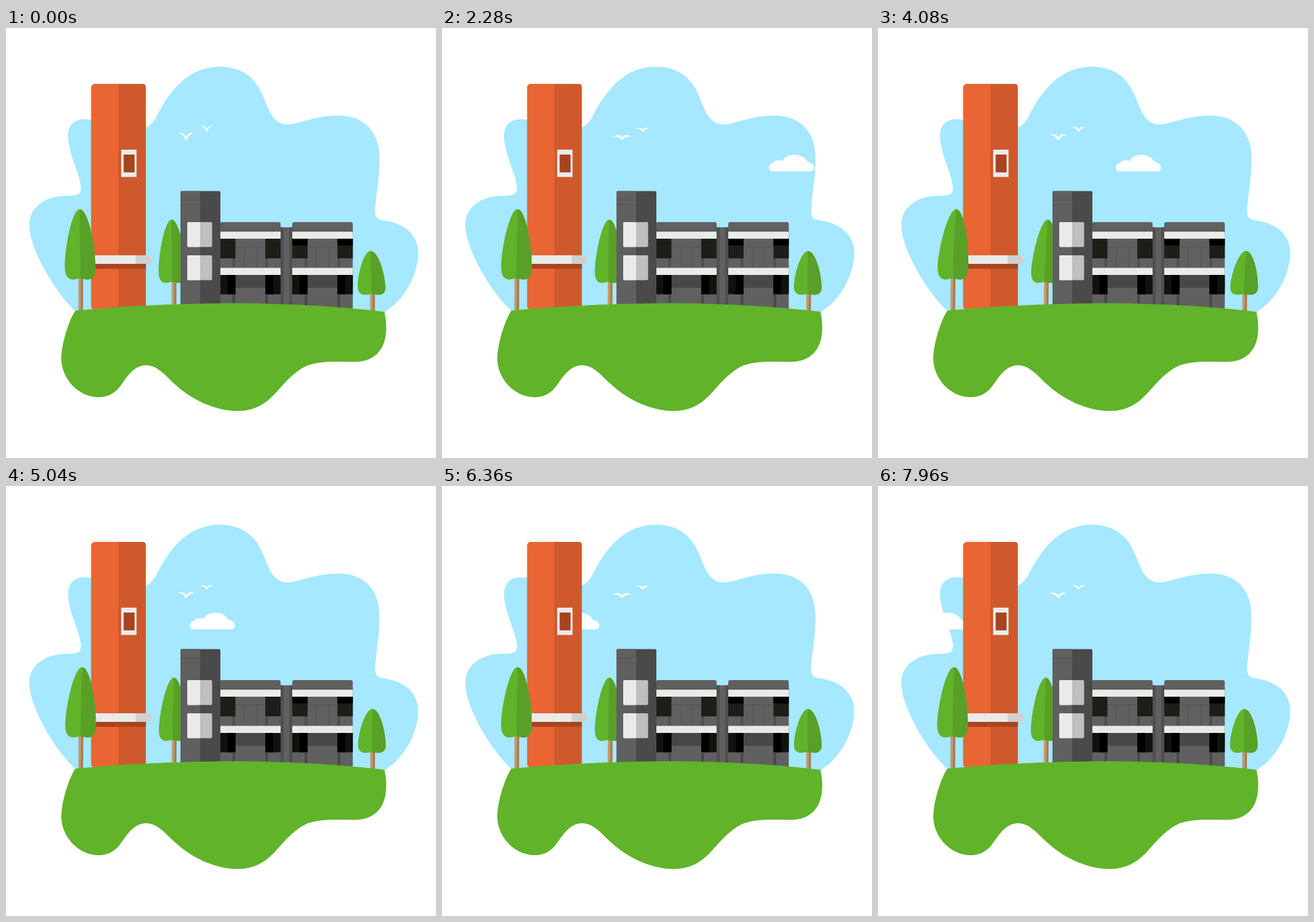
Recreate the animation shown at these times as an HTML page. Size 700 px wide and 700 px high, loop 8 s.

```html
<!DOCTYPE html>
<html lang="en">
<head>
<meta charset="utf-8">
<title>Campus</title>
<style>
html, body { margin: 0; width: 100%; height: 100%; overflow: hidden; background: #fff; }
svg { display: block; width: 100vw; height: 100vh; }
</style>
</head>
<body>
<svg viewBox="0 0 700 700">
  <path fill="#a5e8ff" d="M113 461C80 430 38 360 38 320C38 293 62 275 92 273.5C108 272.5 122 275 122 261C122 240 101 205 101 176C101 158 112 145 139 149.500L180 200L228 162C234 159 239 154 243 148C262 110 292 63 348 63C388 63 408 85 418 110C428 133 434 157 459 157C478 156 502 143 540 142.500C585 142.500 608 170 608 213C608 250 601 275 601 299C601 314 612 312 624 315C650 320 671 338 671 366C671 403 647 444 617 462Z"/>
  <path id="cloud" fill="#fff" d="M6.500 233.500C-2 233.500 -2 220.500 7 219.500C10 214.500 18 214.500 22 216.500C30 202.500 55 202.500 63.500 218C76 220 77 233.500 67 233.500Z"/>
  <g fill="#fff">
    <path class="bird"/>
    <path class="bird" transform="translate(326.800 169) scale(.78) translate(-293.300 -183)"/>
  </g>
  <g id="tower">
    <rect x="138.500" y="91" width="89" height="367.500" rx="6" fill="#e96533"/>
    <path fill="#cf592d" d="M183 91H223Q227.500 91 227.500 96V458.500H183Z"/>
    <path fill="#ebebea" d="M187.500 198h25v44.500h-25z"/>
    <path fill="#a94420" d="M191.500 206h17.800v29h-17.800zM138.500 384h89v8h-89z"/>
    <rect x="131" y="370" width="105.500" height="14" rx="1.500" fill="#e8eae8"/>
    <path fill="#d0d0d0" d="M211 370h24q1.500 0 1.500 1.500v11q0 1.500-1.500 1.500h-24z"/>
  </g>
  <g id="back"></g>
  <g id="hall"></g>
  <g id="front"></g>
  <path fill="#61b329" d="M113 460C200 452 290 448 370 448C455 448 540 453 616 462C619 475 619.500 485 618.500 497C616 525 598 544 567 543.500C530 543.500 502 541 480 555C455 572 445 590 430 603C415 617 397 623.500 377 623.500C337 623 300 603 275 580C262 569 248 549 228 549C207 549 196 570 186 583C178 594 166 601 151 601C117 601 90 570 90 538C90 515 102 476 113 460Z"/>
</svg>
<script>
const LOOP = 8000;
const $ = s => document.querySelector(s);
const make = (parent, tag, attrs) => {
  const el = document.createElementNS('http://www.w3.org/2000/svg', tag);
  for (const k in attrs) el.setAttribute(k, attrs[k]);
  return parent.appendChild(el);
};
const ease = p => p * p * (3 - 2 * p);
// 0 -> 1 -> 0 over one period
const swing = (t, period) => {
  const p = t / period % 1 * 2;
  return ease(p < 1 ? p : 2 - p);
};

// Buildings
const hall = $('#hall');
const box = (x, y, w, h, fill, rx = 0) =>
  make(hall, 'rect', { x, y, width: w, height: h, fill, rx });

box(447, 324.500, 19, 136, '#606060');
box(447, 324.500, 5, 136, '#505050');
box(461, 324.500, 5, 136, '#505050');

function wing(x, deepShade) {
  box(x, 316, 98.500, 145, '#606060', 3);
  box(x, 329.500, 98.500, 2, '#555');
  box(x + 24, 356, 49, .8, '#505050');
  for (const dx of [39, 59]) box(x + dx, 356, .8, 34, '#505050');
  box(x, 402, 98.500, 21, '#484848');
  for (const dx of [0, 73.500]) {
    box(x + dx, 343, 25, 32, '#1c1e17');
    if (deepShade) box(x + dx, 343, 25, 11, '#000');
    box(x + dx, 402, 25, 31.500, '#10120d');
    box(x + dx + (dx ? 0 : 12), 402, 13, 31.500, '#000');
  }
  for (const dx of [20, 73.500]) {
    box(x + dx, 375, 4.500, 15, '#505050');
    box(x + dx, 433.500, 4.500, 28, '#4a4a4a');
  }
  box(x, 331.500, 98.500, 11.500, '#e9ebe9');
  box(x, 390.500, 98.500, 11.500, '#e9ebe9');
}
wing(348.500, false);
wing(466, true);

box(284, 265.500, 65, 196, '#4a4a4a', 2);
box(284, 265.500, 32, 196, '#606060', 2);
for (const y of [279.500, 287]) box(284, y, 32, 1, '#505050');
for (const y of [316, 370]) {
  box(295, y, 40.500, 40.500, '#bfbfbf', 2);
  box(295, y, 21, 40.500, '#e9ebe9', 2);
}

// Trees: x is the crown centre, tip its lean at rest, bend how far the tip sways
const trees = [
  { at: '#front', x: 121, half: 25, tip: -1, top: 295, low: 409, trunk: 121.500, base: 460, bend: 7.700 },
  { at: '#back', x: 270.500, half: 22, tip: -1, top: 312, low: 414.500, trunk: 273.500, base: 450, bend: 7.400 },
  { at: '#front', x: 595.500, half: 22.500, tip: -2, top: 363, low: 434, trunk: 596.500, base: 461, bend: 5.700 }
];
for (const tree of trees) {
  const g = $(tree.at);
  tree.parts = ['#c49a6c', '#a67c52', '#61b32a', '#58a027'].map(fill => make(g, 'path', { fill }));
}

function drawTree(tree, sway) {
  const { x, half, tip, top, low, trunk, base, bend } = tree;
  const lean = y => bend * sway * ((base - y) / (base - top)) ** 2;
  const at = (u, v) => {
    const y = top + v * (low - top);
    return (x + u * half + tip * (1 - v) + lean(y)).toFixed(2) + ' ' + y.toFixed(2);
  };
  const curve = (...pts) => 'C' + pts.map(p => at(...p)).join(' ');
  const post = (l, r) => {
    const y = low - 4, d = lean(y);
    return `M${trunk + l} ${base + 3}L${trunk + l + d} ${y}H${trunk + r + d}L${trunk + r} ${base + 3}Z`;
  };
  const right = 'M' + at(0, 0) +
    curve([.55, 0], [1, .52], [1, .83]) +
    curve([1, .95], [.8, 1], [.5, 1.005]) +
    curve([.3, 1.005], [.15, .99], [0, .99]);
  const left = curve([-.15, .99], [-.3, 1.005], [-.5, 1.005]) +
    curve([-.8, 1], [-1, .95], [-1, .83]) +
    curve([-1, .55], [-.5, 0], [0, 0]) + 'Z';
  const spine = curve([0, .66], [0, .33], [0, 0]) + 'Z';
  [post(-3.800, 3.800), post(.3, 3.800), right + left, right + spine]
    .forEach((d, i) => tree.parts[i].setAttribute('d', d));
}

// Birds: wings blend from raised (0) to spread (1)
function birdPath(k) {
  const mix = (a, b) => (a + (b - a) * k).toFixed(2);
  const tipY = mix(170.500, 179), l = mix(280, 276.700), r = mix(306.700, 310);
  const over = mix(169, 170.800), under = mix(171.800, 175);
  return `M${l} ${tipY}Q${mix(290.500, 288)} ${over} 293.300 178.300` +
    `Q${mix(296.500, 298.800)} ${over} ${r} ${tipY}` +
    `Q${mix(298, 301)} ${under} 295 181.300Q293.300 184 291.600 181.300` +
    `Q${mix(289, 286)} ${under} ${l} ${tipY}Z`;
}

const cloud = $('#cloud');
const birds = document.querySelectorAll('.bird');

function draw(t) {
  cloud.setAttribute('transform', `translate(${616 - 589.500 * ease(t / 9600)} 0)`);
  const wings = birdPath(swing(t, 960));
  birds.forEach(b => b.setAttribute('d', wings));
  const sway = swing(t, 2880);
  trees.forEach(tree => drawTree(tree, sway));
}

const start = performance.now();
function tick() {
  draw((performance.now() - start) % LOOP);
  requestAnimationFrame(tick);
}
tick();
</script>
</body>
</html>
```
